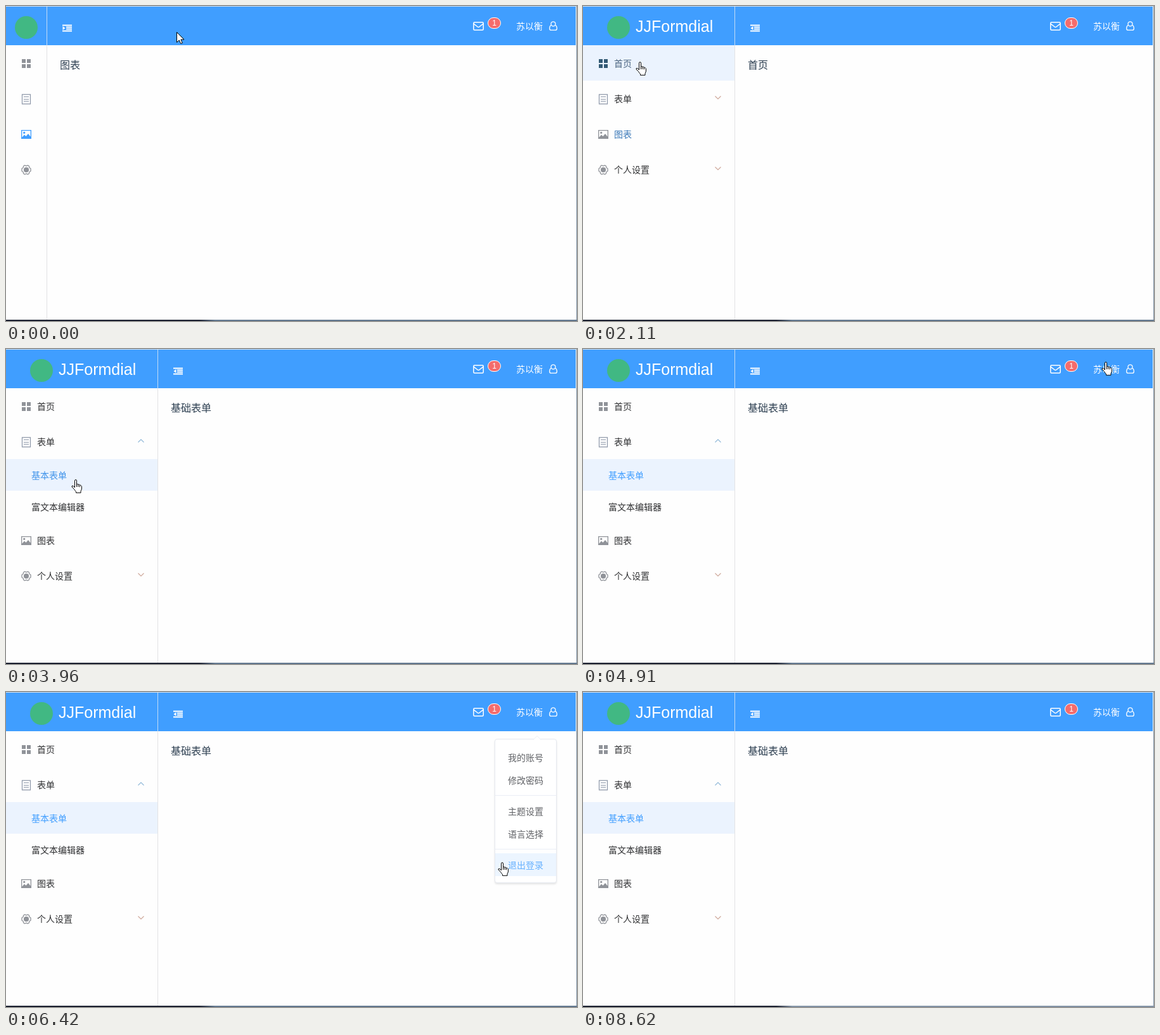
An HTML page for the animation above (8.68 s loop, 901 by 498 pixels).

```html
<!DOCTYPE html>
<html lang="zh-CN">
<head>
<meta charset="utf-8">
<title>Admin layout</title>
<style>
  * { box-sizing: border-box; }
  html, body { margin: 0; width: 100%; height: 100%; overflow: hidden; background: #fff; }
  #stage {
    position: relative; width: 901px; height: 498px; overflow: hidden; background: #fefefe;
    font: 14px "Noto Sans CJK SC", "Noto Sans CJK", "Noto Sans CJK JP", sans-serif;
    color: #303133; white-space: nowrap; cursor: default;
  }
  #stage div, #stage svg, #stage span { position: absolute; }
  svg { display: block; overflow: visible; }

  #topline { left: 0; top: 0; width: 900px; height: 1px; background: #d9e2ea; }
  #head { left: 0; top: 1px; width: 899px; height: 61px; background: #409eff; color: #fff; }
  #brand { left: 0; top: 0; height: 61px; overflow: hidden; border-right: 1px solid #c3dcf6; }
  #mark { top: 15px; width: 36px; height: 36px; border-radius: 50%; background: #41b883; }
  #name { left: 83px; top: 0; line-height: 63px; font-family: "Liberation Sans", Arial, sans-serif; font-size: 25px; }
  #toggle { top: 28px; }
  #badge {
    left: 760px; top: 17px; width: 21px; height: 18px; border: 1px solid #fff; border-radius: 9px;
    background: #f56c6c; font: 12px/16px "Liberation Sans", Arial, sans-serif; text-align: center;
  }
  #user { left: 805px; top: 20px; line-height: 21px; }

  #side { left: 0; top: 62px; height: 434px; overflow: hidden; background: #fefefe; border-right: 1px solid #e2e2e4; }
  .row { left: 0; width: 240px; height: 56px; line-height: 56px; }
  .row > svg { left: 24px; top: 21px; color: #909399; }
  .row > span { left: 49px; }
  .row > .chev { left: 208px; top: 24px; fill: none; stroke: #cda698; stroke-width: 1.1; }
  #sub { left: 0; top: 112px; width: 240px; overflow: hidden; }
  .item { left: 0; width: 240px; height: 50px; padding-left: 40px; line-height: 50px; }
  .hot { background: #ebf3fe; }

  #title { top: 80px; line-height: 24px; font-size: 16px; color: #2c3e50; }
  #bar { left: 891px; top: 64px; width: 6px; height: 322px; border-radius: 3px; background: #c3c5c9; }

  #drop {
    left: 771px; top: 74px; width: 98px; height: 228px; border: 1px solid #e6e9ef; border-radius: 4px;
    background: #fff; box-shadow: 0 2px 3px rgba(0, 0, 0, .1); color: #606266;
  }
  #drop div { left: 0; width: 96px; height: 36px; padding-left: 20px; line-height: 36px; }
  #drop div.hot { background: #ecf5ff; color: #66b1ff; }
  #drop hr { position: absolute; left: 0; width: 96px; height: 1px; margin: 0; border: 0; background: #ebeef5; }
  #drop svg { left: 60px; top: -6px; }

  #right { left: 900px; top: 0; width: 1px; height: 498px; background: #7d8fa2; }
  #bottom { left: 0; top: 496px; width: 901px; height: 2px; background: linear-gradient(90deg, #1b2030 305px, #62788f 330px); }
  #bottom.late { background: linear-gradient(90deg, #1b2030 305px, #8494a6 330px); }
  .pointer { left: 0; top: 0; fill: #fff; stroke: #000; stroke-linejoin: round; }
</style>
</head>
<body>
<div id="stage">
  <div id="title"></div>
  <div id="bar"></div>

  <div id="side">
    <div class="row" id="home" style="top:0">
      <svg width="16" height="16" fill="currentColor"><path d="M1 1h6v6H1zM9 1h6v6H9zM1 9h6v6H1zM9 9h6v6H9z"/></svg>
      <span>首页</span>
    </div>
    <div class="row" id="form" style="top:56px">
      <svg width="16" height="16" fill="none" stroke="#8d97a8"><path d="M1.5.8h13v15h-13zM4 4.5h8M4 8.5h8M4 11.5h8" stroke-width="1.2"/></svg>
      <span>表单</span>
      <svg class="chev" id="formChev" width="10" height="6"><path d="M.5.5 5 5 9.5.5"/></svg>
    </div>
    <div id="sub">
      <div class="item" id="basic" style="top:0">基本表单</div>
      <div class="item" style="top:50px">富文本编辑器</div>
    </div>
    <div class="row" id="chart">
      <svg width="16" height="16" fill="currentColor"><path fill-rule="evenodd" d="M0 1h16v14H0zM1.3 2.3v10.5L5 8.5l2.5 2.6L11 7l3.7 4.5V2.3z"/><circle cx="4.7" cy="5.3" r="1.6"/></svg>
      <span>图表</span>
    </div>
    <div class="row" id="settings">
      <svg width="16" height="16"><circle cx="8" cy="8" r="4.1" fill="currentColor"/><path d="M5.5.8 8 1.8l2.5-1 2 1.5.3 2.2L15 6v4l-2.2 1.5-.3 2.2-2 1.5-2.5-1-2.5 1-2-1.5-.3-2.2L1 10V6l2.2-1.5.3-2.2z" fill="none" stroke="currentColor" stroke-width="1.3" stroke-linejoin="round"/></svg>
      <span>个人设置</span>
      <svg class="chev" width="10" height="6"><path d="M.5.5 5 5 9.5.5"/></svg>
    </div>
  </div>

  <div id="topline"></div>
  <div id="head">
    <div id="brand">
      <div id="mark"></div>
      <span id="name">JJFormdial</span>
    </div>
    <svg id="toggle" width="15" height="12" fill="#fff"><path d="M0 .5h15v2H0zM6 3.5h9v2H6zM6 6.5h9v2H6zM0 9.5h15v2H0z"/><path id="tri"/></svg>
    <svg style="left:737px;top:24px" width="17" height="14" fill="none" stroke="#fff" stroke-width="1.5"><rect x=".8" y=".8" width="15.4" height="12.2" rx="1.5"/><path d="M1 3.2 7.3 8q1.2.9 2.4 0L16 3.2"/></svg>
    <div id="badge">1</div>
    <span id="user">苏以衡</span>
    <svg style="left:857px;top:23px" width="13" height="15" fill="none" stroke="#fff" stroke-width="1.3"><circle cx="6.5" cy="4.3" r="3.5"/><path d="M3.4 6.3Q.7 7.3.7 11.5q0 2.7 2.3 2.7h7q2.3 0 2.3-2.7 0-4.2-2.7-5.2"/></svg>
  </div>

  <div id="drop">
    <svg width="12" height="7"><path d="M0 6.5 6 .5l6 6" fill="#fff" stroke="#ebeef5"/></svg>
    <div style="top:10px">我的账号</div>
    <div style="top:46px">修改密码</div>
    <hr style="top:88px">
    <div style="top:95px">主题设置</div>
    <div style="top:131px">语言选择</div>
    <hr style="top:173px">
    <div style="top:180px">退出登录</div>
  </div>

  <div id="right"></div>
  <div id="bottom"></div>

  <svg class="pointer" id="arrow" width="13" height="20"><path d="M.5.5v16L4.3 13l2.5 5.5 2.5-1L6.9 12H12z"/></svg>
  <svg class="pointer" id="hand" width="17" height="22"><path d="M5.5 13V2.2Q5.5.7 7 .7T8.5 2.2V8Q9.8 7 11 8.2 12.3 7.6 13.3 9 14.8 8.6 15.6 10.2 16.4 10.5 16.4 12v3Q16 17 15 18.5v2.8H7.5v-1.8Q5.5 17.5 4.5 15.5L1 12Q.6 10.4 2 10.2 3.6 10.4 5.5 13z"/><path d="M8.5 8v4M11 8.5V12M13.4 9.3v3" fill="none"/></svg>
</div>

<script>
const LOOP = 8680, STEP = 130;
const BLUE = '#409eff', TEXT = '#303133', GREY = '#909399';
const $ = id => document.getElementById(id);

// Pointer stops: ms, x, y of the hot spot
const path = [
  [0, 269, 41], [380, 142, 67], [810, 92, 34], [1480, 92, 34], [1870, 89, 88],
  [2270, 89, 88], [2660, 104, 149], [3060, 104, 149], [3500, 109, 206], [3960, 109, 206],
  [4340, 620, 90], [4620, 800, 3], [5040, 838, 30], [5320, 838, 30], [5750, 818, 117],
  [5890, 818, 117], [6280, 804, 224], [6700, 734, 368], [7110, 800, 440], [7240, 843, 471],
  [7500, 850, 520]
];

// Value of the last [ms, value] pair that has begun
const pick = (t, ...pairs) => pairs.findLast(([ms]) => ms <= t)[1];
// How many of the given moments have passed
const passed = (t, ...moments) => moments.filter(ms => ms <= t).length;
// Odd passes mean on
const toggled = (t, ...moments) => passed(t, ...moments) % 2 === 1;

// The pointer jumps along each leg in even time steps.
function pointerAt(t) {
  const i = path.findLastIndex(stop => stop[0] <= t);
  const [t0, x0, y0] = path[i];
  const [t1, x1, y1] = path[i + 1] || [LOOP, x0, y0];
  const p = Math.floor((t - t0) / STEP) * STEP / (t1 - t0);
  return [x0 + (x1 - x0) * p, y0 + (y1 - y0) * p].map(Math.round);
}

const options = [...document.querySelectorAll('#drop div')];
const labels = document.querySelectorAll('.row > span, .row > .chev, #name');
const show = (el, on) => { el.style.visibility = on ? 'visible' : 'hidden'; };

function paintRow(id, text, icon) {
  $(id).style.color = text;
  $(id).querySelector('svg').style.color = icon;
}

function drawPointer(t) {
  const [x, y] = pointerAt(t);
  const hand = toggled(t, 810, 4080, 4910, 6560);
  show($('hand'), hand);
  show($('arrow'), !hand);
  $('hand').style.transform = `translate(${x - 6}px, ${y}px)`;
  $('arrow').style.transform = `translate(${x}px, ${y}px)`;
}

function drawMenu(t, width) {
  const open = width > 65;
  $('side').style.width = $('brand').style.width = width + 'px';
  $('mark').style.left = (open ? 38 : 14) + 'px';
  $('toggle').style.left = width + 24 + 'px';
  $('tri').setAttribute('d', open ? 'M4.5 3v6L.5 6z' : 'M.5 3v6l4-3z');
  labels.forEach(el => show(el, open));

  const sub = Math.round(passed(t, 2930, 3060, 3200) * 100 / 3);
  $('sub').style.height = sub + 'px';
  $('chart').style.top = 112 + sub + 'px';
  $('settings').style.top = 168 + sub + 'px';
  $('formChev').style.transform = `rotate(${sub * 1.8}deg)`;
  $('formChev').style.stroke = sub ? '#8fb8d8' : '#cda698';

  const hot = pick(t, [0, ''], [1740, 'home'], [2930, 'form'], [3200, 'basic']);
  for (const id of ['home', 'form', 'basic']) $(id).classList.toggle('hot', id === hot);
  paintRow('home',
    pick(t, [0, TEXT], [2110, '#4a6480'], [2270, BLUE], [3350, TEXT]),
    pick(t, [0, GREY], [2110, '#335a75'], [2270, '#3a7cba'], [2410, BLUE], [3350, GREY]));
  paintRow('chart',
    pick(t, [0, BLUE], [2110, '#3a78b8'], [2270, TEXT]),
    pick(t, [0, BLUE], [2110, GREY]));
  $('basic').style.color = pick(t, [0, TEXT], [3500, '#35608c'], [3810, '#3f93ea'], [4080, BLUE]);
}

function drawPage(t, width) {
  const title = $('title');
  title.textContent = pick(t, [0, '图表'], [1990, '首页'], [3500, ''], [3810, '基础表单']);
  title.style.opacity = pick(t, [0, 1], [1870, .5], [2110, 1], [3810, .5], [3960, 1]);
  title.style.left = width + 20 + 'px';
  show($('bar'), toggled(t, 260, 640, 4080, 4480, 6700, 7910));

  $('drop').style.opacity = pick(t, [0, 0], [5180, .5], [5320, 1], [6700, .4], [6830, 0]);
  const choice = t < 6560 ? passed(t, 5610, 6020, 6150, 6280, 6420) - 1 : -1;
  options.forEach((el, i) => el.classList.toggle('hot', i === choice));
  $('bottom').classList.toggle('late', t >= 8620);
}

function draw(t) {
  const width = Math.round(65 + passed(t, 1230, 1360, 1480) * 175 / 3);
  drawMenu(t, width);
  drawPage(t, width);
  drawPointer(t);
}

const start = performance.now();
function tick() {
  draw((performance.now() - start) % LOOP);
  requestAnimationFrame(tick);
}
tick();
</script>
</body>
</html>
```
